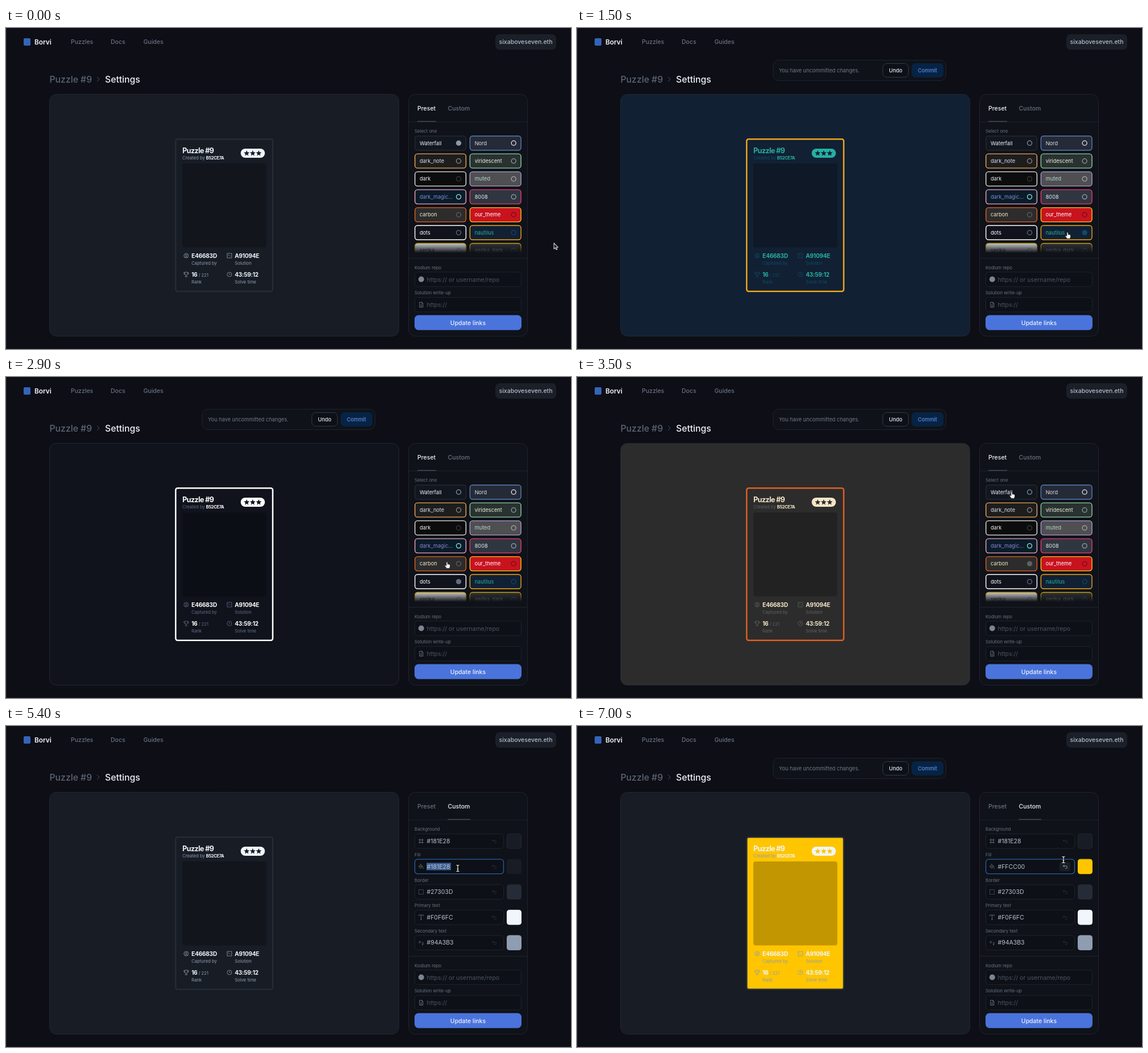
Recreate the animation shown at these times as an HTML page with a canvas. Size 993 px wide and 564 px high, loop 7.1 s.

```html
<!DOCTYPE html>
<html lang="en">
<head>
<meta charset="utf-8">
<title>Puzzle settings</title>
<style>
html, body { margin: 0; width: 100%; height: 100%; overflow: hidden; background: #0d0e16; }
canvas { display: block; }
</style>
</head>
<body>
<canvas id="stage" width="993" height="564"></canvas>
<script>
const ctx = document.getElementById('stage').getContext('2d');
const LOOP = 7100, STEP = 100;
const SM = 7.87, MD = 9.19, LG = 10.5;
const PANEL = '#0f1218', LINE = '#1f242d', FIELD = '#0d1016', MUTED = '#687280';

// name, background, border, primary, secondary
const presets = [
  ['Waterfall', '#12161e', '#232934', '#f0f6fc', '#8a98ab'],
  ['Nord', '#252a37', '#5b7bb5', '#d8dee9', '#e5e9f0'],
  ['dark_note', '#1e1d1c', '#eda95c', '#d2dff4', '#8a8f94'],
  ['viridescent', '#2a3131', '#8cd0a6', '#e9f5db', '#84a59d'],
  ['dark', '#0c0c0d', '#e5e5e5', '#eeeeee', '#3c3c3c'],
  ['muted', '#4f4f51', '#a89cd0', '#b4d2d3', '#a9a4b5'],
  ['dark_magic...', '#0a1c29', '#f0a6c6', '#8f80d2', '#93e8d3'],
  ['8008', '#303640', '#e63c70', '#e9ecf0', '#939eae'],
  ['carbon', '#2c2c2c', '#de5f22', '#f5e6c8', '#616161'],
  ['our_theme', '#c8131f', '#fcc916', '#ffffff', '#6d0f19'],
  ['dots', '#10131c', '#ffffff', '#ffffff', '#646b86'],
  ['nautilus', '#122033', '#efa51e', '#25b0a2', '#0b4c6c'],
  ['serika', '#e1e1e3', '#e2b714', '#323437', '#aaaeb3'],
  ['serika_dark', '#323437', '#e2b714', '#d1d0c5', '#646669']
];
const base = { bg: '#171c25', fill: '#171c25', border: '#252c38', primary: '#f0f6fc', secondary: '#8f9db0' };

const icons = {
  user: 'M4 0A4 4 0 1 1-4 0A4 4 0 1 1 4 0M1.5-.8A1.5 1.5 0 1 1-1.5-.8A1.5 1.5 0 1 1 1.5-.8M-2.4 3C-1.6 1.3 1.6 1.3 2.4 3',
  terminal: 'M-4-4H4V4H-4ZM-2.3-2L-1-.9L-2.3.2M0 .4H2',
  trophy: 'M-2.5-4H2.5V-1A2.5 2.5 0 0 1-2.5-1ZM-2.5-3H-4.3C-4.3-1-3.5 0-2.4 0M2.5-3H4.3C4.3-1 3.5 0 2.4 0M0 1.5V4M-2.2 4H2.2',
  clock: 'M4 0A4 4 0 1 1-4 0A4 4 0 1 1 4 0M0-2.4V0L1.7.8',
  file: 'M-3-4.3H1L3-2.3V4.3H-3ZM1-4.3V-2.3H3M-1.4 2.2H1.4M-1.4.2H1.4',
  undo: 'M-3.5-1H1.3A2 2 0 0 1 1.3 3.3H0M-1.5-3L-3.5-1L-1.5 1',
  frame: 'M-2.2-4.5V4.5M2.2-4.5V4.5M-4.5-2.2H4.5M-4.5 2.2H4.5',
  bucket: 'M-4 0L-.5-3.5L3 0L-.5 3.5ZM-4 0H3M-2-5L0-3M4 2V4',
  square: 'M-4-4H4V4H-4Z',
  type: 'M-4-2.3V-4H4V-2.3M0-4V4M-1.5 4H1.5',
  script: 'M-4-3L-.5 1M-.5-3L-4 1M1.5 0H3.7V1.5L1.5 3.5H4',
  chevron: 'M-2-4L2 0L-2 4'
};
const arrow = new Path2D('M0 0V10.2L2.4 8L4 11.5L5.7 10.7L4.1 7.3H7.3Z');
const hand = new Path2D('M0 0C1 0 1.2.6 1.2 1.2V4C2.5 3.5 5 4 5.5 5.5C6 8 5 9 4.5 11.3H-.8C-2 9-3.5 7.5-4 6.2C-3.4 5.4-2.2 5.6-1.2 6.6V1.2C-1.2.6-1 0 0 0Z');
const beam = new Path2D('M-2.5-5.5C-1-5.5 0-5 0-4C0-5 1-5.5 2.5-5.5M0-4V4M-2.5 5.5C-1 5.5 0 5 0 4C0 5 1 5.5 2.5 5.5M-1.3 1.5H1.3');

// time, x, y
const pointerKeys = [
  [0, 963, 378], [1000, 898, 361], [1250, 862, 359], [1550, 862, 359], [2100, 794, 358],
  [2400, 794, 358], [2800, 775, 325], [3100, 775, 325], [3500, 764, 202], [3750, 764, 202],
  [4150, 805, 140], [4500, 805, 140], [5050, 794, 250], [6400, 794, 250], [6900, 855, 235], [LOOP, 855, 235]
];
// time, selected preset
const picks = [[0, 0], [1400, 11], [2300, 10], [3000, 8], [3600, 0]];
const CUSTOM_AT = 4400, FOCUS_AT = 5100, SELECT_AT = 5300, TYPE_AT = 5800;

function box(x, y, w, h, r, fill, stroke, lw = 1) {
  ctx.beginPath();
  ctx.roundRect(x, y, w, h, r);
  if (fill) { ctx.fillStyle = fill; ctx.fill(); }
  if (stroke) { ctx.strokeStyle = stroke; ctx.lineWidth = lw; ctx.stroke(); }
}

// y is the middle of the capitals; returns the right end
function text(s, x, y, size, color, weight = 400, align = 'left', tracking = 0) {
  ctx.font = `${weight} ${size}px Inter, sans-serif`;
  ctx.letterSpacing = tracking * size + 'px';
  ctx.textAlign = align;
  ctx.fillStyle = color;
  ctx.fillText(s, x, y + size * 0.36);
  return x + ctx.measureText(s).width;
}

function icon(name, x, y, color, dash = []) {
  ctx.save();
  ctx.translate(x, y);
  ctx.strokeStyle = color;
  ctx.lineWidth = 0.8;
  ctx.setLineDash(dash);
  ctx.stroke(new Path2D(icons[name]));
  ctx.restore();
}

function dot(x, y, r, fill) {
  ctx.beginPath();
  ctx.arc(x, y, r, 0, 7);
  ctx.fillStyle = fill;
  ctx.fill();
}

function hline(y, x0, x1, color, lw = 1) {
  ctx.fillStyle = color;
  ctx.fillRect(x0, y, x1 - x0, lw);
}

function star(x, y, r, color) {
  ctx.beginPath();
  for (let i = 0; i < 10; i++) {
    const a = i * Math.PI / 5 - Math.PI / 2, d = i % 2 ? r * 0.45 : r;
    ctx.lineTo(x + d * Math.cos(a), y + d * Math.sin(a));
  }
  ctx.fillStyle = color;
  ctx.fill();
}

function pointerAt(t) {
  const i = pointerKeys.findIndex(k => k[0] > t);
  const [t0, x0, y0] = pointerKeys[i - 1], [t1, x1, y1] = pointerKeys[i];
  const p = (t - t0) / (t1 - t0), e = p * p * (3 - 2 * p);
  return [x0 + (x1 - x0) * e, y0 + (y1 - y0) * e];
}

function drawHeader() {
  box(31, 18, 12, 13, 2, '#3564b8');
  text('Borvi', 50, 24.5, 11.8, '#f4f7fb', 600);
  text('Puzzles', 114, 24.5, LG, MUTED, 500);
  text('Docs', 184, 24.5, LG, MUTED, 500);
  text('Guides', 241.5, 24.5, LG, MUTED, 500);
  box(860, 11, 107, 27, 7, '#1a1f28');
  text('sixaboveseven.eth', 913.5, 24.5, LG, '#b6bfcc', 500, 'center');
  text('Puzzle #9', 76.5, 90.5, 15.75, '#5c6573', 500);
  icon('chevron', 162, 90, '#5c6573');
  text('Settings', 174, 90.5, 15.75, '#eef2f7', 500);
}

function drawNotice() {
  box(344.5, 56.5, 304, 36, 10, PANEL, LINE);
  text('You have uncommitted changes.', 355, 74.5, MD, '#707988');
  box(537.5, 62.5, 45, 24, 7, FIELD, '#343a45');
  text('Undo', 560, 74.5, MD, '#e6ebf2', 500, 'center');
  box(588, 62, 56, 25, 7, '#072344');
  text('Commit', 616, 74.5, MD, '#5d8be0', 500, 'center');
}

function drawCard({ bg, fill, border, primary, secondary }) {
  box(76.5, 116.5, 614, 425, 12, bg, '#212731');
  box(298.2, 195.2, 170.6, 267.6, 3.5, fill, border, 2.5);
  text('Puzzle #9', 310, 215.5, 12.6, primary, 700, 'left', -0.05);
  const end = text('Created by ', 310, 228, 7.6, secondary);
  text('B52CE7A', end, 228, 7.6, primary, 700, 'left', -0.05);
  box(412.5, 212, 42.5, 16, 8, primary);
  [423, 433.6, 444.2].forEach(x => star(x, 220.2, 5.2, fill));
  box(310, 238, 147.5, 147.5, 4, 'rgba(0,0,0,.24)');
  const stats = [
    ['user', 'E46683D', 'Captured by'], ['terminal', 'A91094E', 'Solution'],
    ['trophy', '16', 'Rank'], ['clock', '43:59:12', 'Solve time']
  ];
  stats.forEach(([name, value, label], i) => {
    const x = 326 + i % 2 * 76, y = 400 + (i >> 1) * 33;
    icon(name, x - 9.3, y, secondary);
    const right = text(value, x, y, 10.1, primary, 700, 'left', -0.025);
    if (name === 'trophy') text('/ 221', right + 2, y + 1, 7.7, secondary);
    text(label, x, y + 13, 7.7, secondary);
  });
}

function drawPresets(selected) {
  text('Select one', 718, 181.5, SM, MUTED);
  ctx.save();
  ctx.beginPath();
  ctx.rect(708, 185, 208, 211);
  ctx.clip();
  presets.forEach(([name, bg, border, primary, secondary], i) => {
    const x = 718.7 + i % 2 * 96.7, y = 202.2 + (i >> 1) * 31.47;
    box(x, y - 12.5, 89.7, 25, 4.5, bg, border, 1.4);
    text(name, x + 8.3, y, MD, primary);
    ctx.beginPath();
    ctx.arc(x + 76.8, y, 4, 0, 7);
    ctx.strokeStyle = ctx.fillStyle = secondary;
    ctx.lineWidth = 1.3;
    ctx.stroke();
    if (i === selected) ctx.fill();
  });
  const fade = ctx.createLinearGradient(0, 376, 0, 395);
  fade.addColorStop(0, 'rgba(15,18,24,0)');
  fade.addColorStop(1, PANEL);
  ctx.fillStyle = fade;
  ctx.fillRect(708, 376, 208, 21);
  ctx.restore();
}

function drawCustom(t, typed, theme) {
  const fields = [
    ['Background', 'frame', '#181E28', theme.bg], ['Fill', 'bucket', typed, theme.fill],
    ['Border', 'square', '#27303D', theme.border], ['Primary text', 'type', '#F0F6FC', theme.primary],
    ['Secondary text', 'script', '#94A3B3', theme.secondary]
  ];
  fields.forEach(([label, name, value, color], i) => {
    const y = 202.3 + i * 44.6, focused = i === 1 && t >= FOCUS_AT;
    text(label, 718, y - 20.7, SM, MUTED);
    box(718.5, y - 12.7, 156, 25.5, 5, FIELD, focused ? '#2c5da8' : LINE, focused ? 1.3 : 1);
    icon(name, 729.5, y, '#707988', name === 'square' ? [1.5, 1] : []);
    if (focused && t >= SELECT_AT && t < TYPE_AT) hline(y - 6.5, 739, 782, '#3a5f95', 13);
    text(value, 739.5, y, LG, '#b9c2cf');
    const changed = i === 1 && typed !== '#181E28';
    if (changed) box(848, y - 8, 19, 16, 4, '#1a1f27');
    icon('undo', 858, y, changed ? '#aab4c2' : '#303640');
    box(880.5, y - 12.7, 25, 25.5, 4, color, i === 0 ? '#222833' : color);
  });
}

function drawPanel(t, custom, selected, typed, theme, [px, py]) {
  box(707.5, 116.5, 209, 425, 12, PANEL, LINE);
  if (px > 769 && px < 824 && py > 125 && py < 157) box(769, 125, 55, 32, 7, '#21252d');
  text('Preset', 723, 141, LG, custom ? MUTED : '#f0f4f9', 500);
  text('Custom', 776.5, 141, LG, custom ? '#f0f4f9' : MUTED, 500);
  hline(164.5, 708, 916, LINE);
  hline(163.5, custom ? 776.5 : 723, custom ? 816 : 756, '#4a515d', 1.3);
  if (custom) drawCustom(t, typed, theme);
  else drawPresets(selected);
  hline(404, 708, 916, LINE);
  text('Kodlum repo', 718, 421, SM, MUTED);
  box(718.5, 428.8, 187, 25.5, 5, FIELD, LINE);
  dot(729.8, 441.5, 5, '#7b8492');
  text('https:// or username/repo', 739.5, 441.8, LG, '#4b5461');
  text('Solution write-up', 718, 465.5, SM, MUTED);
  box(718.5, 473.4, 187, 25.5, 5, FIELD, LINE);
  icon('file', 729.8, 486.2, '#7b8492');
  text('https://', 739.5, 486.4, LG, '#4b5461');
  box(718, 504.5, 188, 26.2, 7, '#4a74dc');
  text('Update links', 812, 518, LG, '#eef3fc', 500, 'center');
}

function drawPointer(t, [x, y]) {
  ctx.save();
  ctx.translate(x, y);
  ctx.lineJoin = 'round';
  if (t >= 4950) {
    ctx.strokeStyle = '#111';
    ctx.lineWidth = 2.6;
    ctx.stroke(beam);
    ctx.strokeStyle = '#f4f4f4';
    ctx.lineWidth = 1.2;
    ctx.stroke(beam);
  } else {
    const isHand = t > 1050 && t < 4650, shape = isHand ? hand : arrow;
    ctx.fillStyle = isHand ? '#f6f6f6' : '#101014';
    ctx.strokeStyle = isHand ? '#16161a' : '#d8d8dc';
    ctx.lineWidth = isHand ? 0.8 : 1.1;
    ctx.fill(shape);
    ctx.stroke(shape);
  }
  ctx.restore();
}

function draw(t) {
  const custom = t >= CUSTOM_AT;
  const selected = picks.filter(p => p[0] <= t).pop()[1];
  const count = Math.floor((t - TYPE_AT) / 100) + 1;
  const typed = count > 0 ? '#FFCC00'.slice(0, count) : '#181E28';
  const recolored = typed === '#FFCC00';
  let theme = base;
  if (selected) {
    const [, bg, border, primary, secondary] = presets[selected];
    theme = { bg, fill: bg, border, primary, secondary };
  } else if (recolored) {
    theme = { ...base, fill: '#ffc500' };
  }
  const pointer = pointerAt(t);

  ctx.fillStyle = '#0d0e16';
  ctx.fillRect(0, 0, 993, 564);
  hline(0, 0, 1, '#24252d', 564);
  hline(563, 0, 993, '#1c1320');
  drawHeader();
  if (selected || recolored) drawNotice();
  drawCard(theme);
  drawPanel(t, custom, selected, typed, theme, pointer);
  drawPointer(t, pointer);
}

const start = performance.now();
function tick() {
  const t = (performance.now() - start) % LOOP;
  draw(Math.floor(t / STEP) * STEP);
  requestAnimationFrame(tick);
}
tick();
</script>
</body>
</html>
```
